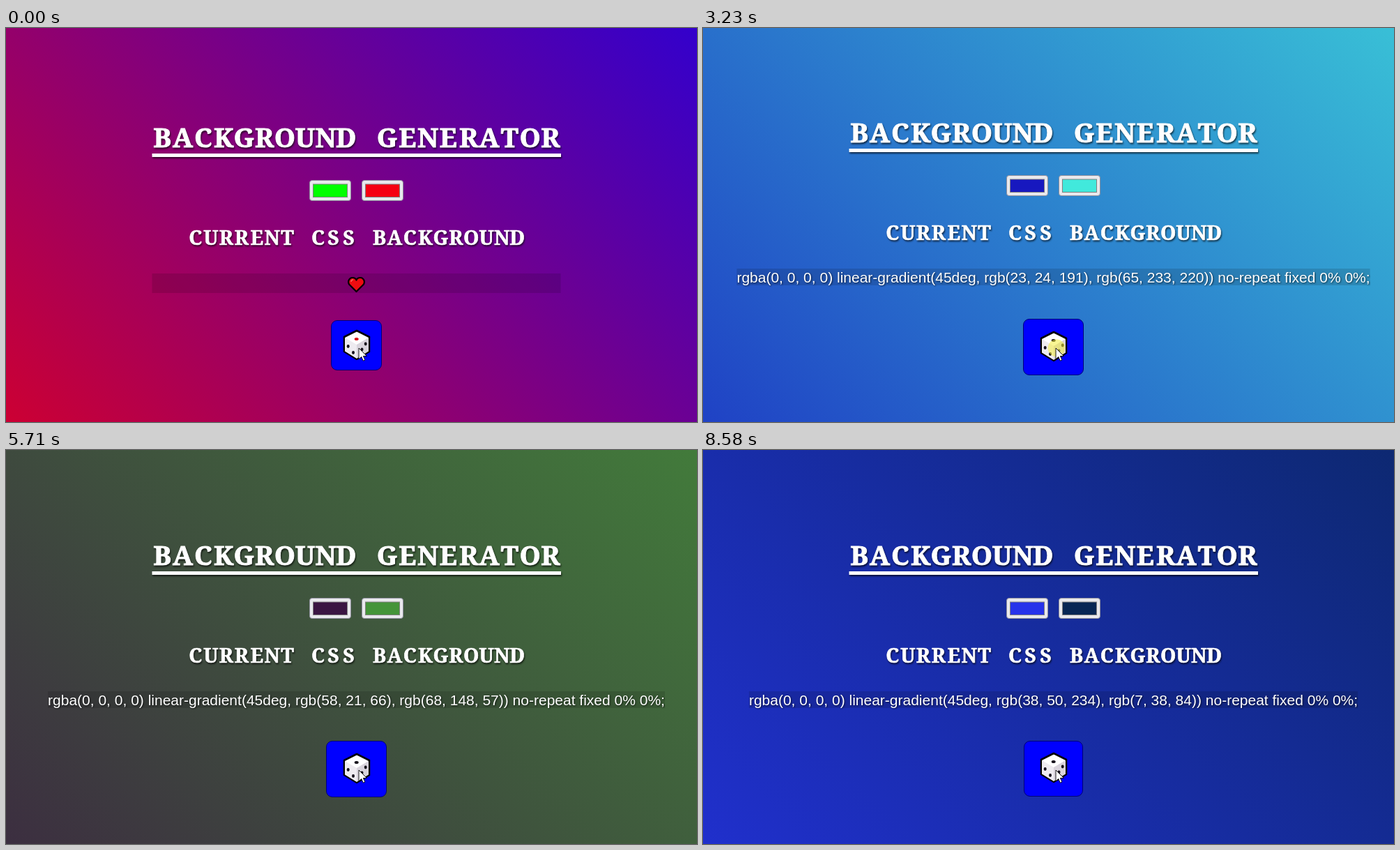
Write an HTML page that moves like this. It is 991 by 565 pixels and loops after 9.19 s.

```html
<!DOCTYPE html>
<html lang="en">
<head>
<meta charset="utf-8">
<title>Background Generator</title>
<style>
html, body { margin: 0; width: 100%; height: 100%; overflow: hidden; }
svg { display: block; width: 991px; height: 565px; }
.heading {
  font-family: "Noto Serif", serif; font-weight: bold;
  fill: #fff; stroke: #fff; text-anchor: middle;
}
.big { font-size: 38.5px; stroke-width: 1px; }
.small { font-size: 28.5px; stroke-width: .7px; }
.shadow { filter: drop-shadow(1.5px 2px 1px rgba(0, 0, 0, .65)); }
.case { fill: #e9e9ed; stroke: #8f8f9d; }
.swatch { stroke: #808080; }
.bar { fill: rgba(0, 0, 0, .13); }
#css {
  font: 21px "Liberation Sans", Arial, sans-serif;
  fill: #fff; text-anchor: middle;
  filter: drop-shadow(1px 1px 1px rgba(0, 0, 0, .6));
}
#button { fill: #00f; stroke: #000078; }
</style>
</head>
<body>
<svg viewBox="0 0 991 565">
  <defs>
    <path id="hex" d="M503 434l18 9v21l-18 11l-18-11v-21z"/>
    <clipPath id="inside"><use href="#hex"/></clipPath>
  </defs>

  <g id="page">
    <g class="shadow">
      <text id="title" class="heading big" y="171">BACKGROUND GENERATOR</text>
      <rect x="209.5" y="180" width="586.5" height="5" fill="#fff"/>
    </g>
    <rect class="case" x="435.5" y="218.5" width="59" height="29" rx="3.5"/>
    <rect class="case" x="510.5" y="218.5" width="59" height="29" rx="3.5"/>
    <rect class="swatch" id="first" x="440.5" y="224" width="49" height="18.5"/>
    <rect class="swatch" id="second" x="515.5" y="224" width="49" height="18.5"/>
    <text id="subtitle" class="heading small shadow" y="310.5">CURRENT CSS BACKGROUND</text>
    <rect class="bar" id="bar" y="352"/>
    <text id="css" x="502.5" y="372"></text>
    <g id="heart">
      <path d="M502.5 378l-10.5-10.5c-2.5-5 1-9.5 5-9.5q4 0 5.5 3.5q1.5-3.500 5.5-3.5c4 0 7.5 4.5 5 9.5z"
        fill="#ee0c10" stroke="#000" stroke-width="2.2" stroke-linejoin="round"/>
      <path d="M495 364q0-3 3-3" fill="none" stroke="#ff6a5e" stroke-width="1.3"/>
    </g>
  </g>

  <rect id="button" rx="8.5"/>
  <g id="die">
    <use href="#hex" fill="#fff" stroke="#000" stroke-width="2.6" stroke-linejoin="round"/>
    <path d="M486 444L503 454v20l-17-10.5z" fill="#eeebf0"/>
    <path d="M520 444L503 454v20l17-10.5z" fill="#d9d4dc"/>
    <ellipse id="pip" cx="502.7" cy="446" rx="3" ry="2"/>
    <g fill="#17121c">
      <ellipse cx="490.7" cy="456.5" rx="2" ry="2.4"/>
      <ellipse cx="498" cy="465.5" rx="2" ry="2.4"/>
      <ellipse cx="515.7" cy="453" rx="2" ry="2.4"/>
      <ellipse cx="510.5" cy="461" rx="2" ry="2.4"/>
    </g>
    <circle id="glow" cx="507" cy="457" r="12.5" fill="#f5ee3c" fill-opacity=".55" clip-path="url(#inside)"/>
  </g>
  <path d="M506 459v16l3.7-3.5l2.5 5.7l2.7-1.2l-2.5-5.5h5z" fill="#fff" stroke="#000" stroke-width=".9"/>
</svg>

<script>
const LOOP = 9190, MID = 502.5, BASE = 586;
const $ = id => document.getElementById(id);

// start time, end of click glow, two colours
const scenes = [
  [0, 0, "255, 0, 0", "0, 0, 255"],
  [960, 960, "118, 92, 148", "96, 142, 128"],
  [2130, 2210, "49, 211, 69", "152, 78, 147"],
  [3230, 3310, "23, 24, 191", "65, 233, 220"],
  [4350, 4480, "151, 112, 157", "216, 103, 243"],
  [5600, 5710, "58, 21, 66", "68, 148, 57"],
  [6620, 6700, "224, 202, 210", "166, 142, 120"],
  [7540, 7630, "132, 118, 164", "94, 108, 122"],
  [8500, 8580, "38, 50, 234", "7, 38, 84"]
];

function set(id, attrs) {
  for (const key in attrs) $(id).setAttribute(key, attrs[key]);
}

// fixed pitch, each letter centred in its cell
function monospace(id, pitch) {
  const n = $(id).textContent.length;
  const xs = Array.from({ length: n }, (_, i) => (MID + (i + .5 - n / 2) * pitch).toFixed(2));
  set(id, { x: xs.join(" ") });
}

function show(index) {
  const [, , a, b] = scenes[index];
  const from = `rgb(${a})`, to = `rgb(${b})`, intro = index === 0;
  // the stage shows the middle 60% of a larger gradient
  document.body.style.background = `linear-gradient(45deg, ${from} -33.33%, ${to} 133.33%)`;
  $("css").textContent = intro ? "" :
    `rgba(0, 0, 0, 0) linear-gradient(45deg, ${from}, ${to}) no-repeat fixed 0% 0%;`;
  $("heart").style.display = intro ? "" : "none";

  // a wider caption makes the button larger and lifts the column
  const width = intro ? BASE : $("css").getComputedTextLength();
  const extra = width - BASE;
  const shift = intro ? 0 : Math.round(2.7 - .03 * extra);
  set("page", { transform: `translate(0 ${shift})` });
  set("bar", { x: MID - width / 2, width, height: intro ? 28 : 24 });
  set("first", { fill: intro ? "#0f0" : from });
  set("second", { fill: intro ? "#f50012" : to });
  set("pip", { fill: intro ? "#d8101c" : "#17121c" });

  const half = Math.round(36.1 + .0215 * extra), height = Math.round(71 + .029 * extra);
  set("button", { x: MID - half, y: intro ? 419.5 : 417.5, width: 2 * half, height });
  set("die", { transform: `translate(0 ${Math.round((height - 71) / 5.5)})` });
}

let current = -1;
function frame(now) {
  const t = now % LOOP;
  const index = scenes.findLastIndex(s => t >= s[0]);
  if (index !== current) show(current = index);
  $("glow").style.display = t < scenes[index][1] ? "" : "none";
  requestAnimationFrame(frame);
}

monospace("title", 29.3);
monospace("subtitle", 21.97);
frame(performance.now());
</script>
</body>
</html>
```
